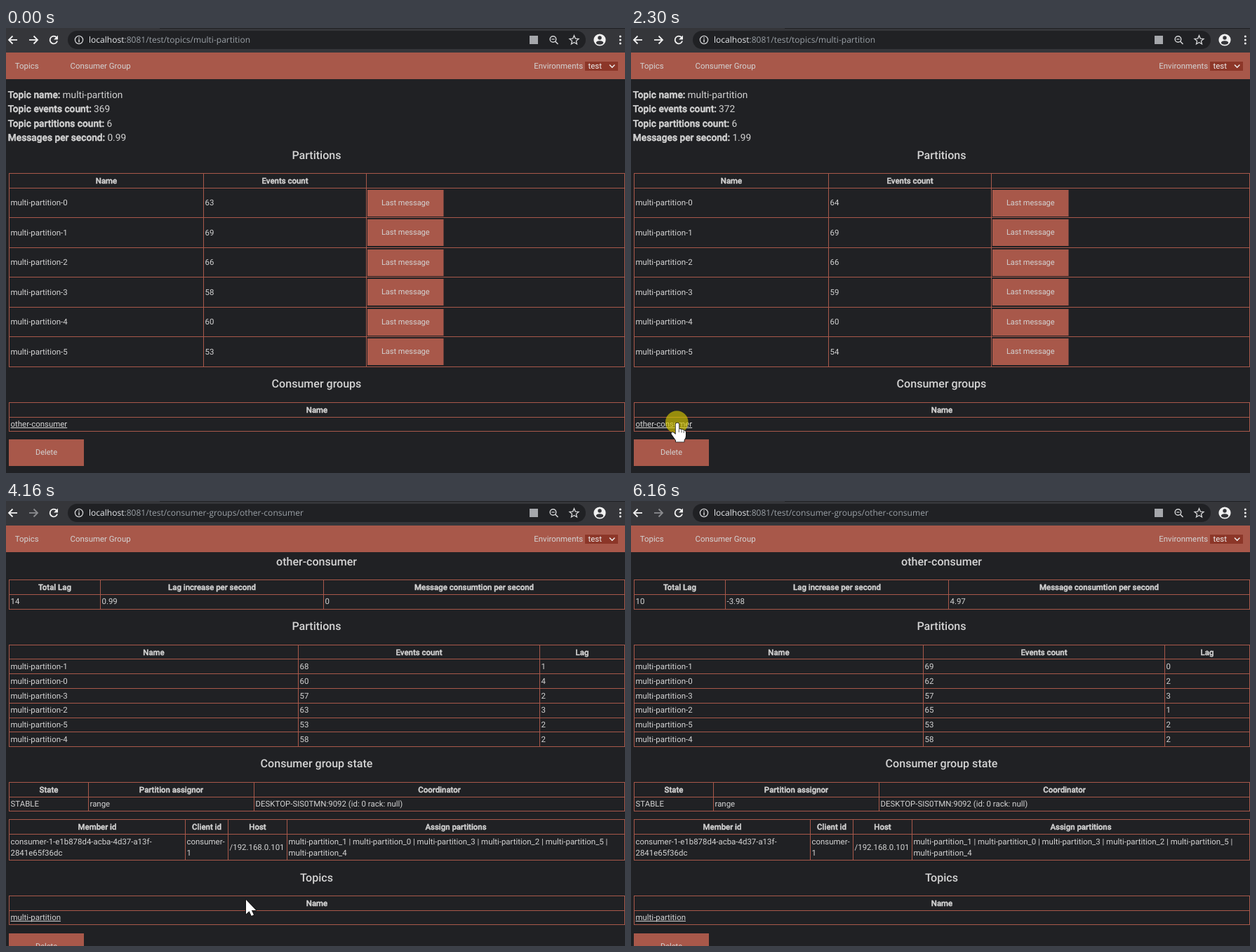
Animation, 882 px wide and 635 px high, one loop 6.33 s. Source, as an HTML page with a canvas:

```html
<!DOCTYPE html>
<html lang="en">
<head>
<meta charset="utf-8">
<title>Topic browser</title>
<style>
html, body { margin: 0; width: 100%; height: 100%; overflow: hidden; background: #202124; }
canvas { display: block; width: 882px; height: 635px; }
</style>
</head>
<body>
<canvas id="stage" width="882" height="635"></canvas>
<script>
const ctx = document.getElementById('stage').getContext('2d');
const W = 882, H = 635, LOOP = 6330;
const BG = '#202124', BAR = '#35363a', RED = '#a8584a', TEXT = '#d3d3d3';
const SMALL = 11.44, MID = 13.73, BIG = 16.06, BTN = 11;
const LEFT = 4, RIGHT = 881, CENTER = 442.5;

function box(x, y, w, h, color) {
  ctx.fillStyle = color;
  ctx.fillRect(x, y, w, h);
}

// cy is the middle of the capitals; returns the text width
function text(str, x, cy, o = {}) {
  const size = o.size || SMALL;
  const y = Math.round(cy + size * 0.355);
  ctx.font = `${o.weight || 400} ${size}px ${o.family || 'Roboto'}, sans-serif`;
  ctx.textAlign = o.align || 'left';
  ctx.fillStyle = ctx.strokeStyle = o.color || TEXT;
  ctx.fillText(str, x, y);
  if (o.bold) {
    ctx.lineWidth = size / 26;
    ctx.strokeText(str, x, y);
  }
  const width = ctx.measureText(str).width;
  if (o.underline) ctx.fillRect(x, y + 1, width, 1);
  return width;
}

const heading = (str, cy) => text(str, CENTER, cy, { size: BIG, weight: 500, align: 'center' });
const link = (str, cy) => text(str, LEFT + 2.5, cy, { underline: true });

function button(label, x, y, w) {
  box(x, y, w, 38, RED);
  text(label, x + w / 2, y + 18.5, { size: BTN, align: 'center' });
}

// cols: left edges of the columns, lines: heights of the rules
function grid(cols, lines, heads) {
  const edges = [...cols, RIGHT], top = lines[0], end = lines[lines.length - 1];
  for (const y of lines) box(LEFT, y, RIGHT - LEFT + 1, 1, RED);
  for (const x of edges) box(x, top, 1, end - top + 1, RED);
  heads.forEach((h, i) => text(h, (edges[i] + edges[i + 1]) / 2 + 0.5, top + 10.5,
    { weight: 500, bold: true, align: 'center' }));
}

function row(cols, cy, cells) {
  cells.forEach((c, i) => text(String(c), cols[i] + 2.5, cy));
}

function line(color, width, ...pts) {
  ctx.strokeStyle = color;
  ctx.lineWidth = width;
  ctx.beginPath();
  pts.forEach(([x, y]) => ctx.lineTo(x, y));
  ctx.stroke();
}

function ring(x, y, r, color, width, from = 0, to = Math.PI * 2) {
  ctx.strokeStyle = color;
  ctx.lineWidth = width;
  ctx.beginPath();
  ctx.arc(x, y, r, from, to);
  ctx.stroke();
}

function disc(x, y, r, color) {
  ctx.fillStyle = color;
  ctx.beginPath();
  ctx.arc(x, y, r, 0, Math.PI * 2);
  ctx.fill();
}

function arrowIcon(x, dir, color) {
  line(color, 1.8, [x - 6 * dir, 17], [x + 5.5 * dir, 17]);
  line(color, 1.8, [x + 0.5 * dir, 11.5], [x + 6 * dir, 17], [x + 0.5 * dir, 22.5]);
}

function star(x, y, r) {
  ctx.beginPath();
  for (let i = 0; i < 10; i++) {
    const a = i * Math.PI / 5 - Math.PI / 2, d = i % 2 ? r * 0.45 : r;
    ctx.lineTo(x + d * Math.cos(a), y + d * Math.sin(a));
  }
  ctx.closePath();
  ctx.strokeStyle = '#d5d6d8';
  ctx.lineWidth = 1.3;
  ctx.stroke();
}

function browser(path, canGoForward) {
  const white = '#f1f1f1', pale = '#d5d6d8';
  box(0, 0, W, 35, BAR);
  box(219, 0, W - 219, 1, BG);
  ctx.fillStyle = BG;
  ctx.beginPath();
  ctx.roundRect(88, 4, 738, 26, 13);
  ctx.fill();

  arrowIcon(10, -1, white);
  arrowIcon(39, 1, canGoForward ? white : '#8b8c8f');
  ring(68, 17, 5.3, white, 1.8, 0.3, Math.PI * 1.75);
  ctx.fillStyle = white;
  ctx.beginPath();
  ctx.moveTo(74, 10.5);
  ctx.lineTo(74, 16.5);
  ctx.lineTo(68, 16.5);
  ctx.fill();

  ring(104, 17, 5.6, pale, 1.3);
  box(103.3, 16, 1.5, 4.5, pale);
  box(103.3, 13.5, 1.5, 1.5, pale);

  const url = { size: 12.05, family: '"Open Sans"', color: '#e8eaed' };
  const w = text('localhost', 118, 17, url);
  text(path, 118 + w, 17, { ...url, color: '#9aa0a6' });

  box(746, 11, 12, 12, '#a5a7ab');
  ring(779.5, 16, 4.3, pale, 1.4);
  line(pale, 1.6, [782.5, 19], [786.5, 23]);
  line(pale, 1.2, [777.3, 16], [781.7, 16]);
  star(809.5, 17.5, 6.8);

  disc(846, 17, 8.6, white);
  disc(846, 14, 2.7, BAR);
  ctx.beginPath();
  ctx.ellipse(846, 21, 5.2, 2.8, 0, 0, Math.PI * 2);
  ctx.fill();
  for (const y of [12, 17, 22]) disc(875.3, y, 1.5, white);
}

function nav() {
  box(0, 35, W, 38, RED);
  text('Topics', 12.8, 54);
  text('Consumer Group', 91.5, 54);
  text('Environments', 752.3, 54);
  box(825, 48, 47, 13, '#8c3628');
  text('test', 829.5, 54, { color: '#eee' });
  line('#eee', 1.5, [860, 52.5], [863.7, 56.2], [867.4, 52.5]);
}

const latest = (states, t) => states.filter(s => s.at <= t).pop();

const topicStates = [
  { at: 0, total: 369, rate: '0.99', counts: [63, 69, 66, 58, 60, 53] },
  { at: 70, total: 369, rate: '0', counts: [63, 69, 66, 58, 60, 53] },
  { at: 1070, total: 370, rate: '1', counts: [63, 69, 66, 58, 60, 54] },
  { at: 2070, total: 372, rate: '1.99', counts: [64, 69, 66, 59, 60, 54] }
];

function topicPage(t) {
  const s = latest(topicStates, t);
  browser(':8081/test/topics/multi-partition', true);
  nav();
  [['Topic name:', 'multi-partition'], ['Topic events count:', s.total],
   ['Topic partitions count:', 6], ['Messages per second:', s.rate]].forEach(([k, v], i) => {
    const y = 95 + i * 20.4;
    const w = text(k, 2.8, y, { size: MID, weight: 500, bold: true });
    text(String(v), 2.8 + w + 3.2, y, { size: MID });
  });

  heading('Partitions', 181);
  const cols = [LEFT, 281, 513];
  const rules = s.counts.map((_, i) => Math.round(270.4 + i * 42.5));
  grid(cols, [207, 228, ...rules], ['Name', 'Events count', '']);
  s.counts.forEach((n, i) => {
    row(cols, 249.3 + i * 42.5, ['multi-partition-' + i, n]);
    button('Last message', 515, Math.round(230.7 + i * 42.45), 108.5);
  });

  heading('Consumer groups', 507);
  grid([LEFT], [534, 555, 575], ['Name']);
  link('other-consumer', 565);
  button('Delete', 4, 587, 107);
}

const order = [1, 0, 3, 2, 5, 4];
const early = [68, 60, 57, 63, 53, 58];
const groupStates = [
  { at: 2380, sums: ['13', '0', '0'], counts: early, lags: [1, 4, 2, 3, 1, 2] },
  { at: 3390, sums: ['14', '0.99', '0'], counts: early, lags: [1, 4, 2, 3, 2, 2] },
  { at: 4390, sums: ['14', '0', '0'], counts: early, lags: [1, 4, 2, 3, 2, 2] },
  { at: 5400, sums: ['10', '-3.98', '4.97'], counts: [69, 62, 57, 65, 53, 58], lags: [0, 2, 3, 1, 2, 2] }
];

function groupPage(t) {
  const s = latest(groupStates, t);
  browser(':8081/test/consumer-groups/other-consumer', false);
  nav();
  heading('other-consumer', 86);
  let cols = [LEFT, 134, 452];
  grid(cols, [112, 133, 154], ['Total Lag', 'Lag increase per second', 'Message consumtion per second']);
  row(cols, 143, s.sums);

  heading('Partitions', 178);
  cols = [LEFT, 416, 760];
  const rules = Array.from({ length: 8 }, (_, i) => Math.round(204.6 + i * 20.8));
  grid(cols, rules, ['Name', 'Events count', 'Lag']);
  order.forEach((p, i) => row(cols, 236 + i * 20.75, ['multi-partition-' + p, s.counts[i], s.lags[i]]));

  heading('Consumer group state', 374);
  cols = [LEFT, 117, 353];
  grid(cols, [401, 422, 442], ['State', 'Partition assignor', 'Coordinator']);
  row(cols, 432, ['STABLE', 'range', 'DESKTOP-SIS0TMN:9092 (id: 0 rack: null)']);

  cols = [LEFT, 255, 316, 400];
  grid(cols, [454, 475, 512], ['Member id', 'Client id', 'Host', 'Assign partitions']);
  const parts = order.map(p => 'multi-partition_' + p);
  row(cols, 485.5, ['consumer-1-e1b878d4-acba-4d37-a13f-', 'consumer-', '', parts.slice(0, 5).join(' | ') + ' |']);
  row(cols, 493.5, ['', '', '/192.168.0.101']);
  row(cols, 501.5, ['2841e65f36dc', '1', '', parts[5]]);

  heading('Topics', 537);
  grid([LEFT], [563, 584, 604], ['Name']);
  link('multi-partition', 594);
  button('Delete', 4, 617, 107);
}

// pointer route: step, x, y
const route = [
  [0, 773, 624], [4, 575, 580], [8, 402, 552], [11, 283, 538], [13, 200, 536],
  [15, 120, 546], [17, 68, 563], [18, 66, 564], [34, 66, 564], [37, 90, 564],
  [39, 126, 565], [43, 222, 567], [48, 372, 570], [52, 507, 574], [55, 609, 591], [60, 758, 624]
];

function along(k) {
  const i = Math.max(1, route.findIndex(p => p[0] >= k));
  const [a, b] = [route[i - 1], route[i]];
  const f = (k - a[0]) / (b[0] - a[0]);
  return [a[1] + (b[1] - a[1]) * f, a[2] + (b[2] - a[2]) * f].map(Math.round);
}

const arrowShape = new Path2D('M0 0V20.5L4.6 16.2L7.8 23L11 21.6L7.9 15H14.2Z');
const handShape = new Path2D('M-2.3 1.6Q-2 -.5 0 -.5Q2 -.5 2.3 1.6V8.5Q4.5 7.5 6 9.3' +
  'Q8 8.6 9.2 10.6Q12 10.2 12 13V18Q12 21.5 9.6 24V26.5H-2V24.5L-8.3 15.5' +
  'Q-9 12.8 -6.3 12.8L-2.3 16Z');

function pointer(t) {
  const k = Math.floor((t - 526) / 77.1);
  if (k < 0 || k > 60) return;
  const [x, y] = along(k);
  const hand = k >= 17 && k < 24;
  if (t >= 2300 && t < 2380) disc(65.3, 562.5, 16.3, 'rgba(215,200,0,0.65)');
  ctx.save();
  ctx.translate(x, y);
  ctx.lineJoin = 'round';
  ctx.strokeStyle = '#111';
  ctx.lineWidth = 1.6;
  ctx.fillStyle = '#fff';
  ctx.stroke(hand ? handShape : arrowShape);
  ctx.fill(hand ? handShape : arrowShape);
  if (hand) {
    line('#333', 0.8, [2.3, 8.5], [2.3, 13]);
    line('#333', 0.8, [6, 9.5], [6, 13.5]);
    line('#333', 0.8, [9.2, 10.8], [9.2, 14]);
  }
  ctx.restore();
}

const start = performance.now();

function draw(now) {
  const t = Math.max(0, now - start) % LOOP;
  ctx.textRendering = 'geometricPrecision';
  box(0, 0, W, H, BG);
  (t < 2380 ? topicPage : groupPage)(t);
  pointer(t);
  requestAnimationFrame(draw);
}
draw(start);
</script>
</body>
</html>
```
